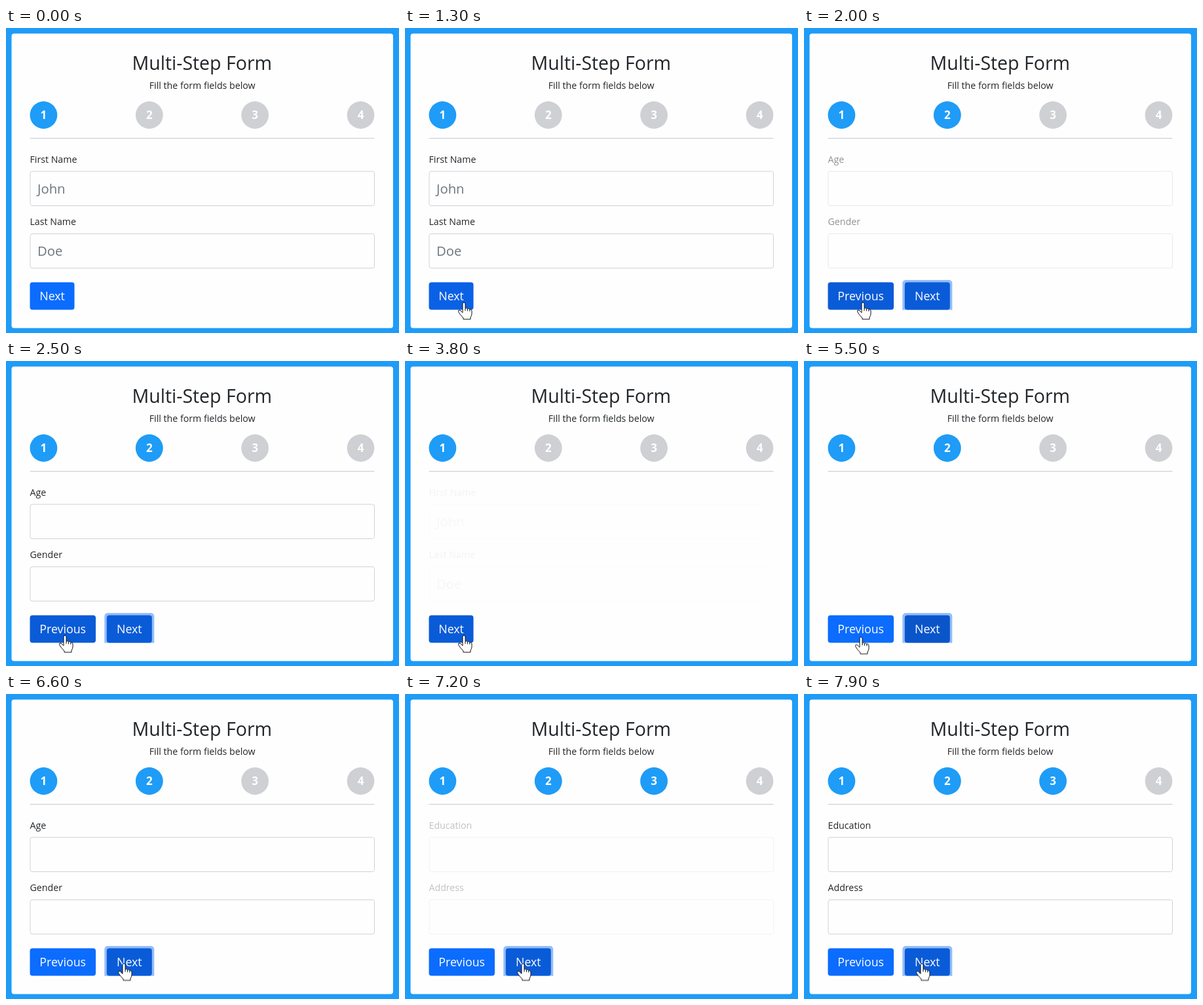
Recreate the animation shown at these times as an HTML page. Size 600x466 px, loop 8 s.

```html
<!DOCTYPE html>
<html lang="en">
<head>
<meta charset="utf-8">
<title>Multi-Step Form</title>
<style>
  :root { --accent: #1e9cf7; --btn: #0b6cfe; --hover: #0a5bd7; --press: #0a55ca; }
  html, body { margin: 0; width: 100%; height: 100%; overflow: hidden; background: var(--accent); }
  svg { display: block; width: 600px; height: 466px; font: 14.2px "Open Sans", sans-serif; fill: #212529; }

  .mid { text-anchor: middle; }
  .title { font-size: 28.5px; }
  .num { font-size: 17px; font-weight: 700; fill: #fff; }
  .off { fill: #ced0d3; }
  .on { fill: var(--accent); }
  .field { fill: #fefefe; stroke: #ced2da; }
  .hint { font-size: 20.3px; fill: #6c757d; }
  .btn { fill: var(--btn); }
  .cap { font-size: 17.8px; fill: #fff; text-anchor: middle; }
  .ring { fill: #92bdfb; }
  .pointer path { fill: #fff; stroke: #111; stroke-linejoin: round; }

  /* hard switches */
  .solo, .pair, .third, .hand, .arrow { animation: 8s step-end infinite; }
  .solo { animation-name: solo; }
  .pair { animation-name: pair; }
  .third { animation-name: third; }
  .hand { animation-name: hand; }
  .arrow { animation-name: arrow; }
  @keyframes solo { 0%, 46.25% { visibility: visible } 21.25%, 68.5%, 100% { visibility: hidden } }
  @keyframes pair { 0%, 46.25% { visibility: hidden } 21.25%, 68.5%, 100% { visibility: visible } }
  @keyframes third { 0% { visibility: hidden } 87.5%, 100% { visibility: visible } }
  @keyframes hand {
    0%, 51.6%, 77.6% { visibility: hidden }
    15%, 60.9%, 78.4%, 100% { visibility: visible }
  }
  @keyframes arrow {
    0%, 15%, 60.9%, 78.4%, 100% { visibility: hidden }
    12.5%, 51.6%, 77.6% { visibility: visible }
  }

  /* field panels fade in, cut out */
  .names, .person, .place { animation: 8s linear infinite; }
  .names { animation-name: names; }
  .person { animation-name: person; }
  .place { animation-name: place; }
  @keyframes names {
    0%, 21.24% { opacity: 1 } 21.25%, 47.25% { opacity: 0 }
    52.75%, 68.49% { opacity: 1 } 68.5%, 100% { opacity: 0 }
  }
  @keyframes person {
    0%, 22.25% { opacity: 0 } 27.75%, 46.24% { opacity: 1 }
    46.25%, 69.5% { opacity: 0 } 75%, 87.49% { opacity: 1 } 87.5%, 100% { opacity: 0 }
  }
  @keyframes place { 0%, 88.5% { opacity: 0 } 94%, 100% { opacity: 1 } }

  /* button tints */
  .first { animation: first 8s linear infinite; }
  .prev { animation: prev 8s linear infinite; }
  .next { animation: next 8s linear infinite; }
  @keyframes first {
    0%, 15% { fill: var(--btn) } 17%, 51.6% { fill: var(--hover) }
    53.4%, 60.9% { fill: var(--btn) } 62.8%, 100% { fill: var(--hover) }
  }
  @keyframes prev {
    0%, 21.25% { fill: var(--btn) } 23.1%, 46.25% { fill: var(--hover) }
    46.3%, 69.5% { fill: var(--btn) } 71.4%, 77.6% { fill: var(--hover) } 79.5%, 100% { fill: var(--btn) }
  }
  @keyframes next {
    0%, 21.25% { fill: var(--press) } 23.1%, 68.4% { fill: var(--hover) }
    68.5%, 69.5% { fill: var(--press) } 71.4%, 100% { fill: var(--hover) }
  }

  .pointer { animation: roam 8s ease-in-out infinite; }
  @keyframes roam {
    0%, 12.4% { transform: translate(118px, 463px) }
    15.5%, 49.4% { transform: translate(90px, 419px) }
    53.2%, 59.4% { transform: translate(115px, 418px) }
    63.2%, 75% { transform: translate(87px, 421.5px) }
    80%, 100% { transform: translate(180px, 411.5px) }
  }
</style>
</head>
<body>
<svg viewBox="0 0 600 466">
  <defs>
    <circle id="dot" cy="133" r="20.9"/>
    <g id="fields" class="field">
      <rect x="37" y="219" width="525.5" height="52.5" rx="3"/>
      <rect x="37" y="314.4" width="525.5" height="52.5" rx="3"/>
    </g>
  </defs>

  <rect x="8.5" y="8.5" width="582.5" height="450" rx="4" fill="#fefefe"/>
  <text class="mid title" x="299.3" y="63.6">Multi-Step Form</text>
  <text class="mid" x="299.7" y="92.6">Fill the form fields below</text>

  <use href="#dot" x="57.4" class="on"/>
  <use href="#dot" x="218.8" class="off"/>
  <use href="#dot" x="380.1" class="off"/>
  <use href="#dot" x="541.5" class="off"/>
  <g class="pair"><use href="#dot" x="218.8" class="on"/></g>
  <g class="third"><use href="#dot" x="380.1" class="on"/></g>
  <g class="mid num">
    <text x="57.4" y="139.3">1</text>
    <text x="218.8" y="139.3">2</text>
    <text x="380.1" y="139.3">3</text>
    <text x="541.5" y="139.3">4</text>
  </g>
  <rect x="36.5" y="168" width="526" height="1" fill="#cacbd0"/>

  <g class="names">
    <use href="#fields"/>
    <text x="36.5" y="206">First Name</text>
    <text x="36.5" y="301.2">Last Name</text>
    <text class="hint" x="48" y="252.6">John</text>
    <text class="hint" x="48" y="348">Doe</text>
  </g>
  <g class="person">
    <use href="#fields"/>
    <text x="36.5" y="206">Age</text>
    <text x="36.5" y="301.2">Gender</text>
  </g>
  <g class="place">
    <use href="#fields"/>
    <text x="36.5" y="206">Education</text>
    <text x="36.5" y="301.2">Address</text>
  </g>

  <g class="solo">
    <rect class="btn first" x="36.5" y="388.5" width="68" height="42" rx="4"/>
    <text class="cap" x="70.6" y="415.6">Next</text>
  </g>
  <g class="pair">
    <rect class="btn prev" x="36.5" y="388.5" width="100.5" height="42" rx="4"/>
    <text class="cap" x="86.7" y="415.6">Previous</text>
    <path class="ring" d="M150.3 430.7V390a5 5 0 0 1 5-5h66a5 5 0 0 1 5 5v40.700z"/>
    <rect class="btn next" x="153.8" y="388.5" width="69" height="42" rx="4"/>
    <text class="cap" x="188.3" y="415.6">Next</text>
  </g>

  <g class="pointer">
    <path class="arrow" d="M0 0V19.500L4.500 15.500L8 22.500L11 21L7.800 14.300H14.500Z"/>
    <path class="hand" d="M-2 2Q0 -1.500 2 2V9.500Q4.200 7.500 5.500 10Q7.600 8.600 8.800 11Q11.200 9.800 12 13V18Q11.600 21 10 23V26H-1V24Q-6 19 -8.500 14.500Q-9 11.500 -6 12L-2 16ZM2 9.500V13M5.500 10V13.500M8.800 11V14"/>
  </g>
</svg>
</body>
</html>
```
